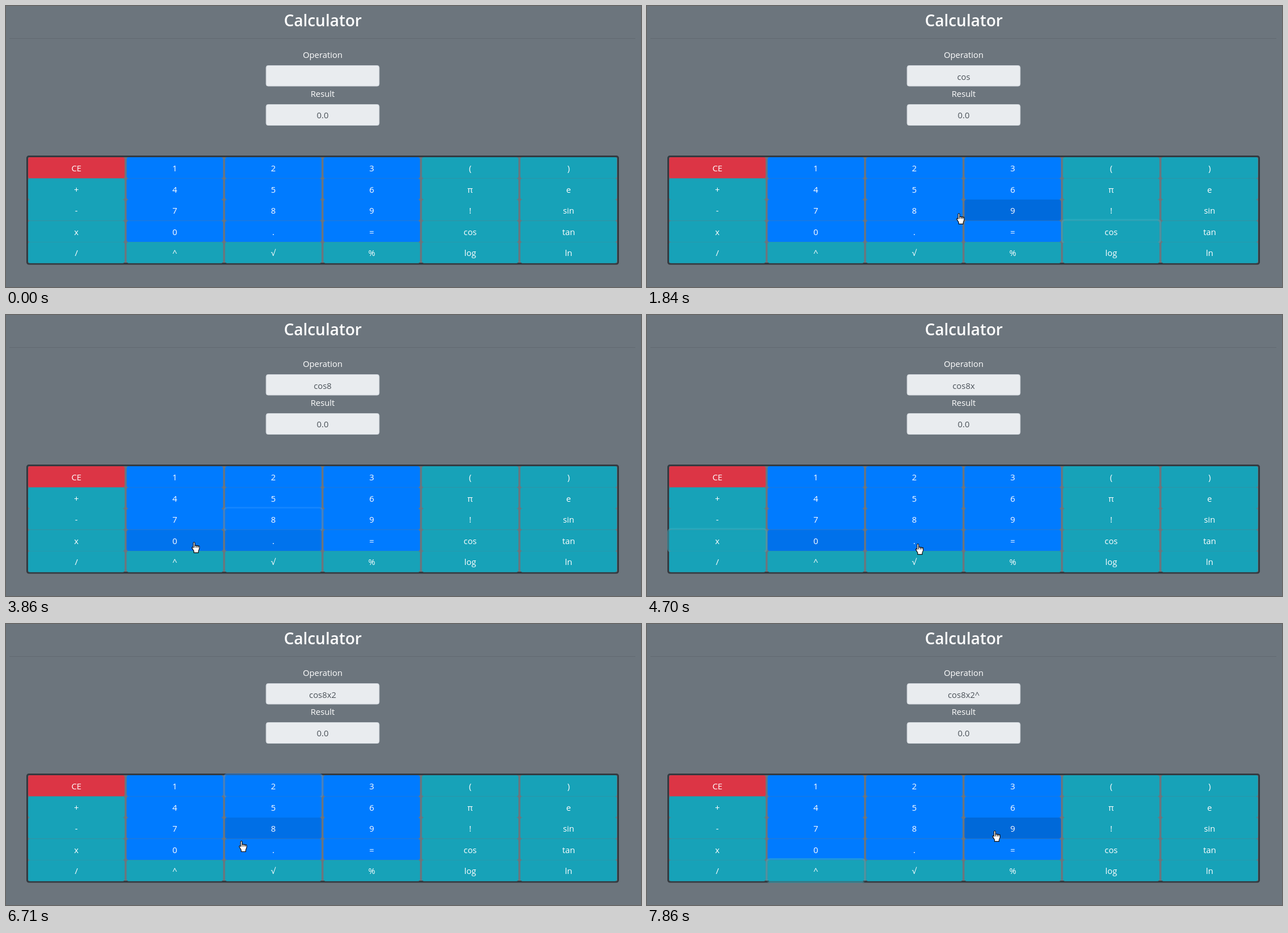
An HTML page for the animation above (8000 ms loop, 1123x498 px).

```html
<!DOCTYPE html>
<html lang="en">
<head>
<meta charset="utf-8">
<title>Calculator</title>
<style>
  html, body { margin: 0; width: 100%; height: 100%; overflow: hidden; background: #6c757d; }
  svg { display: block; width: 1123px; height: 498px; }
  text { font: 14.85px "Open Sans", "Noto Sans", sans-serif; fill: #fff; text-anchor: middle; }
  .title { font-size: 28px; font-weight: 600; }
  .value { fill: #495057; }
  .field { fill: #e9ecef; stroke: #ced4da; }
</style>
</head>
<body>
<svg id="stage" viewBox="0 0 1123 498" xmlns="http://www.w3.org/2000/svg">
  <rect width="1123" height="498" fill="#6c757d"/>
  <text class="title" x="560.3" y="35.5">Calculator</text>
  <rect x="6" y="57" width="1107" height="1" fill="#000" opacity=".1"/>
  <text x="560" y="92">Operation</text>
  <rect class="field" x="460" y="105.5" width="200" height="36.5" rx="3.5"/>
  <text class="value" id="entry" x="560" y="130.5"></text>
  <text x="560" y="160.5">Result</text>
  <rect class="field" x="460" y="174.5" width="200" height="37" rx="3.5"/>
  <text class="value" x="560" y="199.2">0.0</text>
  <rect x="37.5" y="266.5" width="1045" height="190.5" rx="3" fill="none" stroke="#343a40" stroke-width="3"/>
  <g id="pad"></g>
  <g id="hand" stroke="#000" stroke-width="1.2" stroke-linejoin="round" stroke-linecap="round">
    <path fill="#fff" d="M3.5 11.5V2Q5-1 6.5 2V7.6Q8.5 6 9.9 7.9Q11.8 6.6 12.9 8.4Q15.5 7.4 15.5 9.5V13.2L13.5 18.5V21.5H4.6V18.2L.7 11.8Q1 8.8 3.5 11.5Z"/>
    <path fill="none" d="M6.5 7.6V11M9.9 7.9V11M12.9 8.4V11"/>
  </g>
</svg>
<script>
const LOOP = 8000, START = 140, STEP = 77.2, FADE = 150, LAG = 20;
const COL = 174.1, ROW = 37.55, LEFT = 39.2, TOP = 268, KEY_W = 170.6, KEY_H = 37.5;

const rows = ['CE 1 2 3 ( )', '+ 4 5 6 π e', '- 7 8 9 ! sin', 'x 0 . = cos tan', '/ ^ √ % log ln'];
const themes = {
  red: { base: [220, 53, 69], dark: [200, 35, 51], ring: 'rgba(225,83,97,.5)' },
  blue: { base: [0, 123, 255], dark: [0, 105, 217], ring: 'rgba(38,143,255,.5)' },
  teal: { base: [23, 162, 184], dark: [19, 132, 150], ring: 'rgba(58,176,195,.5)' }
};

// Moments when a key is pressed
const presses = [[975, 'cos'], [2845, '8'], [4215, 'x'], [6245, '2'], [7095, '^']];
const HOLD = 76;

// Pointer tip: time, x, y
const path = [
  [140, 899, 440], [350, 840, 411], [520, 826, 398], [1300, 826, 398], [1560, 725, 379],
  [1840, 551, 367], [2140, 479, 371], [3060, 479, 371], [3170, 561, 362], [3230, 596, 359],
  [3310, 612, 362], [3480, 540, 378], [3850, 330, 402], [4160, 140, 401], [4390, 140, 401],
  [4470, 170, 402], [4640, 387, 405], [4700, 482, 405], [4860, 512, 409], [5040, 512, 409],
  [5400, 400, 434], [5560, 332, 428], [5630, 324, 406], [5780, 425, 298], [5960, 466, 282],
  [6400, 466, 282], [6560, 448, 335], [6710, 414, 386.5], [6870, 350, 428], [7020, 318, 435],
  [7240, 318, 435], [7480, 420, 405], [7680, 560, 377], [7860, 615, 366]
];

const byId = id => document.getElementById(id);
const clamp = v => Math.max(0, Math.min(1, v));

function add(parent, tag, attrs) {
  const el = document.createElementNS('http://www.w3.org/2000/svg', tag);
  for (const name in attrs) el.setAttribute(name, attrs[name]);
  return parent.appendChild(el);
}

const pad = byId('pad'), entry = byId('entry'), hand = byId('hand');
const keys = rows.flatMap((line, r) => line.split(' ').map((label, c) => {
  const x = LEFT + c * COL, y = TOP + r * ROW;
  const theme = themes[label === 'CE' ? 'red' : c > 0 && c < 4 && r < 4 ? 'blue' : 'teal'];
  const ring = add(pad, 'rect', {
    x: x - 1.6, y: y - 1.6, width: KEY_W + 3.2, height: KEY_H + 3.2, rx: 5.5,
    fill: 'none', stroke: theme.ring, 'stroke-width': 3.2, opacity: 0
  });
  const face = add(pad, 'rect', { x, y, width: KEY_W, height: KEY_H, rx: 4 });
  add(pad, 'text', { x: x + KEY_W / 2, y: y + 25 }).textContent = label;
  return { label, x, y, theme, ring, face };
}));
for (let c = 1; c < 6; c++)
  add(pad, 'rect', { x: LEFT + c * COL - 5, y: 455, width: 7, height: 1.5, fill: '#343a40' });

// Smooth curve through the points that never overshoots
function slope(i, axis) {
  if (i < 1 || i > path.length - 2) return 0;
  const rate = k => (path[k + 1][axis] - path[k][axis]) / (path[k + 1][0] - path[k][0]);
  const a = rate(i - 1), b = rate(i);
  return a * b <= 0 ? 0 : 2 * a * b / (a + b);
}

function tip(t) {
  let i = 0;
  while (i < path.length - 2 && path[i + 1][0] < t) i++;
  const p = path[i], q = path[i + 1], span = q[0] - p[0], u = clamp((t - p[0]) / span);
  return [1, 2].map(axis => {
    const v = 1 - u;
    return v * v * (1 + 2 * u) * p[axis] + u * u * (3 - 2 * u) * q[axis]
      + span * u * v * (v * slope(i, axis) - u * slope(i + 1, axis));
  });
}

function keyAt(t) {
  if (t < START - LAG) return null;
  const [x, y] = tip(t);
  return keys.find(k => x >= k.x && x < k.x + KEY_W && y >= k.y && y < k.y + ROW);
}

// Hover levels follow from the last stretch of the pointer's way
function hoverLevels(t) {
  const level = new Map(), dt = 10;
  for (let s = t - 400; s <= t; s += dt) {
    const over = keyAt(s - LAG);
    if (over && !level.has(over)) level.set(over, 0);
    for (const [k, v] of level) level.set(k, clamp(v + (k === over ? dt : -dt) / FADE));
  }
  return level;
}

function ringLevel(label, t) {
  const i = presses.findIndex(p => p[1] === label);
  if (i < 0) return 0;
  const next = presses[i + 1];
  return clamp((t - presses[i][0]) / FADE) - (next ? clamp((t - next[0]) / FADE) : 0);
}

function draw(time) {
  const n = Math.min(100, Math.floor((time - START + 10) / STEP));
  const t = n < 0 ? 0 : START + n * STEP;
  const level = hoverLevels(t);
  for (const k of keys) {
    const down = presses.some(p => p[1] === k.label && t >= p[0] && t < p[0] + HOLD);
    const v = (level.get(k) || 0) + (down ? 0.36 : 0);
    const rgb = k.theme.base.map((b, i) => Math.round(b + (k.theme.dark[i] - b) * v));
    k.face.setAttribute('fill', `rgb(${rgb})`);
    k.ring.setAttribute('opacity', ringLevel(k.label, t));
  }
  entry.textContent = presses.filter(p => t >= p[0] + HOLD).map(p => p[1]).join('');
  const [x, y] = tip(t);
  hand.setAttribute('visibility', n < 0 ? 'hidden' : 'visible');
  hand.setAttribute('transform', `translate(${x - 4.5} ${y}) scale(.9)`);
}

const begin = performance.now();
function tick() {
  draw((performance.now() - begin) % LOOP);
  requestAnimationFrame(tick);
}
tick();
</script>
</body>
</html>
```
